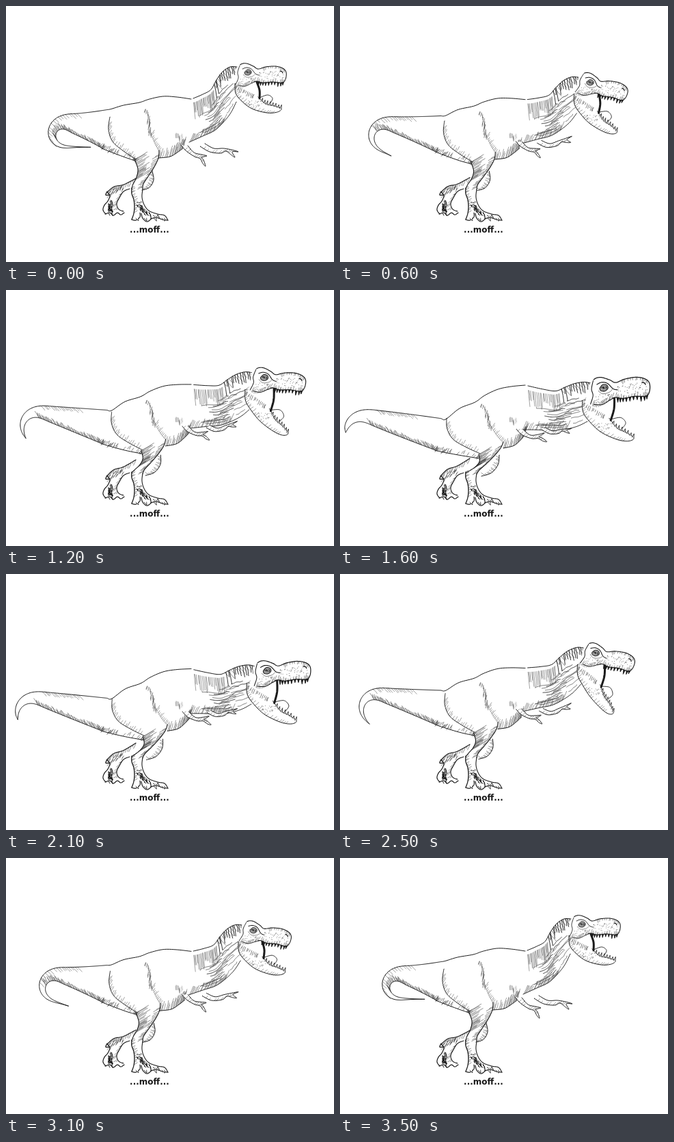
An HTML page with a canvas for the animation above (3700 ms loop, 480 by 374 pixels).

```html
<!DOCTYPE html>
<html lang="en">
<head>
<meta charset="utf-8">
<title>Roaring dinosaur</title>
<style>
html, body { margin: 0; width: 100%; height: 100%; overflow: hidden; background: #fff; }
canvas { display: block; }
</style>
</head>
<body>
<canvas id="stage" width="480" height="374"></canvas>
<script>
const ctx = document.getElementById('stage').getContext('2d');
const INK = '#1a1a1a', GREY = 'rgba(25,25,25,.68)', PALE = 'rgba(25,25,25,.4)';
const LOOP = 3700, STEP = 200, LAST = 8, HOLD_END = 2100;

let seed = 1;
const rnd = () => (seed = (seed * 16807) % 2147483647) / 2147483647;
const jit = a => (rnd() - .5) * 2 * a;
const lerp = (a, b, f) => a + (b - a) * f;
const smooth = v => {
  const t = Math.max(0, Math.min(1, v));
  return t * t * (3 - 2 * t);
};

// How far each motion has gone, from pose p = 0 (upright) to 8 (stretched out).
let p = 0, s = 0, sway = 0, nod = 0, lunge = 0, lift = 0;
function setPose(n) {
  p = n;
  s = p / LAST;
  sway = s ** 1.5;
  lunge = smooth((p - 4.7) / 2.7);
  nod = .38 * smooth(p / 4) + .62 * lunge;
  lift = Math.sin(Math.PI * s);
}

function pts(text) {
  return text.split(',').map(pair => pair.split(' ').map(Number));
}

// Shifts a line: its first point by a, its last by b, the rest in between.
function drift(text, a, b, fx = sway, fy = sway, power = 1) {
  const q = pts(text);
  return q.map(([x, y], i) => {
    const t = (i / (q.length - 1)) ** power;
    return [x + lerp(a[0], b[0], t) * fx, y + lerp(a[1], b[1], t) * fy];
  });
}

// Turns a limb about its joint, more so towards its end.
function bend(text, x, y, angle, size, reach) {
  return pts(text).map(([px, py]) => {
    const a = angle * Math.min(1, Math.hypot(px, py) / reach);
    const c = Math.cos(a) * size, d = Math.sin(a) * size;
    return [x + px * c - py * d, y + px * d + py * c];
  });
}

// The tail follows a heading that curls towards the tip; returns both edges.
function tailEdges() {
  const n = 22, top = [], under = [];
  let x = 149, y = 180 + 32 * sway;
  for (let i = 0; i <= n; i++) {
    const u = i / n;
    const a = -.17 - .01 * p + (3.3 - .14 * p) * smooth((u - .3 - .04 * p) / .5);
    const w = (30 - .75 * p) * (1 - u) ** (1.9 - .15 * p);
    const nx = -Math.sin(a) * w, ny = -Math.cos(a) * w;
    top.push([x + nx, y + ny]);
    under.push([x - nx, y - ny]);
    x -= Math.cos(a) * 157 / n;
    y += Math.sin(a) * 157 / n;
  }
  return [top, under];
}

// Catmull-Rom point at u in 0..1.
function at(q, u) {
  const n = q.length - 1, i = Math.min(n - 1, Math.floor(u * n)), t = u * n - i;
  const a = q[Math.max(0, i - 1)], b = q[i], c = q[i + 1], d = q[Math.min(n, i + 2)];
  return [0, 1].map(k => .5 * (2 * b[k] + (c[k] - a[k]) * t
    + (2 * a[k] - 5 * b[k] + 4 * c[k] - d[k]) * t * t
    + (3 * b[k] - a[k] - 3 * c[k] + d[k]) * t * t * t));
}

function trace(q, u0 = 0, u1 = 1) {
  const n = q.length * 7;
  ctx.beginPath();
  for (let i = 0; i <= n; i++) ctx.lineTo(...at(q, lerp(u0, u1, i / n)));
}

function line(q, width = 1, color = INK, u0, u1) {
  trace(q, u0, u1);
  ctx.lineWidth = width;
  ctx.strokeStyle = color;
  ctx.stroke();
}

function blank(q) {
  trace(q);
  ctx.fillStyle = '#fff';
  ctx.fill();
}

function hatch(q, u0, u1, n, dx, dy, width = .7, color = GREY) {
  ctx.lineWidth = width;
  ctx.strokeStyle = color;
  ctx.beginPath();
  for (let i = 0; i < n; i++) {
    const [x, y] = at(q, lerp(u0, u1, (i + rnd() * .7) / n));
    const k = .5 + rnd() * .7;
    ctx.moveTo(x, y);
    ctx.quadraticCurveTo(x + dx * k * .5 + jit(1.2), y + dy * k * .5 + jit(1.2), x + dx * k, y + dy * k);
  }
  ctx.stroke();
}

// Loose short strokes scattered along a line.
function scribble(q, spread, n, dx, dy, width = 1, color = INK) {
  ctx.lineWidth = width;
  ctx.strokeStyle = color;
  ctx.beginPath();
  for (let i = 0; i < n; i++) {
    const [x, y] = at(q, rnd()), a = x + jit(spread), b = y + jit(spread);
    ctx.moveTo(a, b);
    ctx.lineTo(a + dx + jit(1), b + dy + jit(1));
  }
  ctx.stroke();
}

function spikes(q, u0, u1, n, dx, dy, half, color) {
  ctx.lineWidth = .8;
  ctx.strokeStyle = INK;
  ctx.fillStyle = color;
  for (let i = 0; i < n; i++) {
    const [x, y] = at(q, lerp(u0, u1, (i + .5) / n)), k = .75 + rnd() * .4;
    ctx.beginPath();
    ctx.moveTo(x - half, y);
    ctx.lineTo(x + dx * k, y + dy * k);
    ctx.lineTo(x + half, y);
    ctx.fill();
    ctx.stroke();
  }
}

function dots(x, y, rx, ry, n) {
  ctx.fillStyle = GREY;
  for (let i = 0; i < n; i++) ctx.fillRect(x + jit(rx), y + jit(ry), .8, .8);
}

const between = (a, b, v, u0, u1) => Array.from({ length: 6 }, (_, i) => {
  const u = lerp(u0, u1, i / 5), q = at(a, u), r = at(b, u);
  return [lerp(q[0], r[0], v) + jit(.8), lerp(q[1], r[1], v) + jit(.8)];
});

function drawFeet() {
  const heel = pts('148 272,152 277,149 285,144 291,142 298,146 304');
  const instep = pts('181 267,172 271,166 280,162 289,165 297,172 300');
  line(heel, 1.2);
  line(instep, 1.1);
  scribble(pts('154 284,152 292,153 301'), 3, 38, 1, 3);
  scribble(pts('150 273,160 268,172 265'), 3, 22, -3, 4, .7, GREY);
  hatch(instep, .2, .8, 9, -5, 4);
  line(pts('145 304,152 302,157 306,163 302,168 305,173 302'), 1.2);
  line(pts('151 276,146 276,148 271'), 1.3);

  const shin = pts('184 266,184 274,187 283,188 293,187 303,184 312');
  const front = pts('200 268,199 279,202 290,209 299,222 304,232 306,237 313');
  line(shin, 1.3);
  line(front, 1.1);
  hatch(shin, 0, .8, 14, 5, -3);
  scribble(pts('194 288,198 296,206 302,222 307'), 3, 60, 1, 1.5);
  line(pts('184 312,190 313,196 308,196 302'), 1.2);
  line(pts('198 303,200 310,206 315,212 311,211 305'), 1.2);
  line(pts('212 311,220 309,229 312,237 313'), 1.2);
  spikes(pts('188 310,234 310'), 0, 1, 4, 2, 4, 1.8, '#fff');
}

function drawRear() {
  const [top, under] = tailEdges();
  const back = drift('271 136,250 133,230 132,210 136,195 141,172 145', [0, 3], [3, 28]);
  const rump = drift('174 221,189 226', [-1, 20], [14, 20]);
  const hip = drift('152 162,150 180,156 198,172 212,190 224', [4, 25], [15, 15]);
  const flank = drift('206 152,209 165,212 185,218 201,224 212', [3, 16], [15, 11]);
  const belly = drift('223 222,240 220,252 213,260 207', [16, 9], [11, 4]);
  const thigh = drift('224 211,223 222,217 235,208 249,201 260,200 268', [15, 11], [0, 1]);
  const ham = drift('188 224,193 238,191 250,186 260,184 267', [15, 16], [0, 0]);
  const farThigh = drift('214 241,216 254,210 265,199 269', [19, 0], [8, 3]);
  const farShin = drift('190 252,172 261,158 264,148 272', [0, -6], [-1, 0]);
  const bottom = [...under.slice().reverse(), ...rump];

  line(farShin, 1.1);
  hatch(farShin, 0, .9, 15, -3, 7);
  line(farThigh);
  hatch(farThigh, .1, .9, 14, -5, -3);
  drawFeet();

  line([...back, ...top]);
  line(bottom);
  hatch(bottom, .3, .92, 52, -5, -8);
  hatch(top, .3, .65, 18, 6, 6, .6);
  scribble([...under.slice(0, 2).reverse(), ...rump], 3, 34, 3, -4, .8, GREY);
  line(hip, .9);
  hatch(hip, .15, .95, 20, 4, -6, .6);
  line(flank, .7, PALE);
  scribble(flank.slice(0, 3), 2, 20, -1, 5, .7, GREY);
  hatch(flank, .5, 1, 12, 4, -5, .6);
  line(thigh, 1.1);
  line(ham, 1.1);
  hatch(ham, 0, .6, 20, 17, -10);
  hatch(thigh, .1, .9, 18, -8, 4);
  line(belly);
  hatch(belly, 0, 1, 24, 4, -15, .6);
  scribble(pts('244 186,258 190'), 3, 12, 1, 6, .6, PALE);
}

function drawNeck() {
  const neck = drift('338 89,328 89,317 96,308 108,300 122,288 129,274 135', [32, 48], [1, 5], s, nod, 1.6);
  const chest = drift('337 140,329 156,318 170,305 182,288 190,268 199', [25, 52], [-2, 5], s, nod);
  line(neck);
  line(chest, .9);
  hatch(neck, .04, .6, 13, 3, 17, .9, INK);
  hatch(neck, .1, .6, 10, 8, 9, .7);
  hatch(between(neck, chest, .1, .6, 1), 0, 1, 24, 2, 20, .6);
  for (let i = 0; i < 24; i++) {
    const u = .02 + rnd() * .5;
    line(between(neck, chest, .35 + i * .025, u, Math.min(.98, u + .12 + rnd() * .3)), .85, i % 3 ? GREY : INK);
  }
  hatch(chest, .4, 1, 26, 5, -11, .65);
}

function drawArm(q) {
  blank(q);
  line(q, 1);
  hatch(q, .03, .35, 10, 4, -4, .6);
}

function drawArms() {
  drawArm(bend('-3 2,11 10,27 12,35 9,42 14,48 18,44 10,53 10,43 7,31 5,17 5,4 -2',
    287 + 1.4 * p, 203 - 5 * lift, -.3 * lift - .2 * s, 1 - .25 * s, 53));
  drawArm(bend('-5 0,3 9,15 17,23 20,27 27,31 31,28 22,25 18,33 16,25 14,14 11,5 1',
    261 + .25 * p, 203 - 6 * lift, -.35 * s, 1 - .1 * lift, 44));
}

// The head's place and its jaw angle.
const headPose = () => ({
  x: 354 + 4 * p,
  y: 97 + 46 * nod,
  turn: .22 * smooth(p / 3) - .32 * lunge,
  size: 1 + .2 * s ** 3
});

function drawJaw(head) {
  const open = .47 * smooth((p - 1) / 4) - .33 * lunge;
  const place = (text) => bend(text, 337 + 2.5 * p, 118 + 49 * nod, open, 1 + .2 * s, 73);
  const jaw = place('-2 -5,-1 9,7 20,23 32,45 38,60 37,66 32,55 28,43 25,34 17,25 8,15 0');
  const corner = jaw[9];
  blank(jaw);
  line(place('34 16,46 12,53 17,49 25'), .9);
  line(jaw, 1, INK, 0, .84);
  spikes(jaw.slice(6, 10), 0, .9, 8, 1.5, -5, 1.2, '#fff');
  hatch(jaw, 0, .42, 24, 5, -4, .6);
  hatch(place('0 -2,14 6,27 12'), 0, 1, 14, -2, 5, .8);
  const [x, y] = place('27 25')[0];
  dots(x, y, 10, 5, 28);

  const lip = [head.x + 13 * head.size, head.y + (14 + 13 * head.turn) * head.size];
  line([lip, [(lip[0] + corner[0]) / 2 + 2, (lip[1] + corner[1]) / 2], corner], 3, INK);
}

function drawHead(head) {
  const skull = pts('-18 -5,-10 -12,-2 -13,8 -9,15 -5,26 -8,40 -9,51 -6,56 0,55 10,50 15,36 14,22 15,12 13,2 17,-8 22,-16 20,-18 8');
  ctx.save();
  ctx.translate(head.x, head.y);
  ctx.rotate(head.turn);
  ctx.scale(head.size, head.size);
  blank(skull);
  line(skull, 1.05, INK, .05, .78);
  line(pts('-12 -10,-15 0,-14 8,-18 18'), .9);
  line(pts('12 13,5 16,-4 20,-14 19'), .9);

  line(pts('-8 -5,-2 -7,5 -5,11 2,16 4'), 1);
  trace(pts('-5 0,-1 -4,4 -3,5 1,1 4,-4 3,-5 0'));
  ctx.fillStyle = '#999';
  ctx.fill();
  line(pts('-5 0,-1 -4,4 -3,5 1,1 4,-4 3,-5 0'), .9);
  scribble(pts('-2 0,2 0'), 1.5, 7, 1, 1, .8);
  line(pts('-7 3,-2 7,6 6,10 3'), .7, GREY);

  line(pts('47 -2,50 -1,51 1'), 1.2);
  hatch(skull, .27, .45, 14, -1, 5, .6);
  hatch(skull, .56, .76, 18, 1, -5, .6);
  hatch(skull, .78, .95, 12, 3, -6, .6);
  dots(33, 3, 19, 6, 46);
  dots(-3, 12, 9, 5, 24);
  spikes(skull, .57, .75, 10, -.5, 5.5, 1.2, INK);
  ctx.restore();
}

function drawCaption() {
  ctx.font = 'bold 12px "DejaVu Sans", sans-serif';
  ctx.textAlign = 'center';
  ctx.fillStyle = INK;
  ctx.fillText('...moff...', 210, 331);
}

function draw() {
  seed = 4211;
  ctx.fillStyle = '#fff';
  ctx.fillRect(0, 0, 480, 374);
  ctx.lineCap = ctx.lineJoin = 'round';
  const head = headPose();
  drawRear();
  drawNeck();
  drawArms();
  drawJaw(head);
  drawHead(head);
  drawCaption();
}

function poseAt(t) {
  if (t < HOLD_END) return Math.min(LAST, Math.floor(t / STEP));
  return LAST - 1 - Math.floor((t - HOLD_END) / STEP);
}

function tick() {
  const next = poseAt(performance.now() % LOOP);
  if (next !== p) {
    setPose(next);
    draw();
  }
  requestAnimationFrame(tick);
}

setPose(0);
draw();
tick();
</script>
</body>
</html>
```
